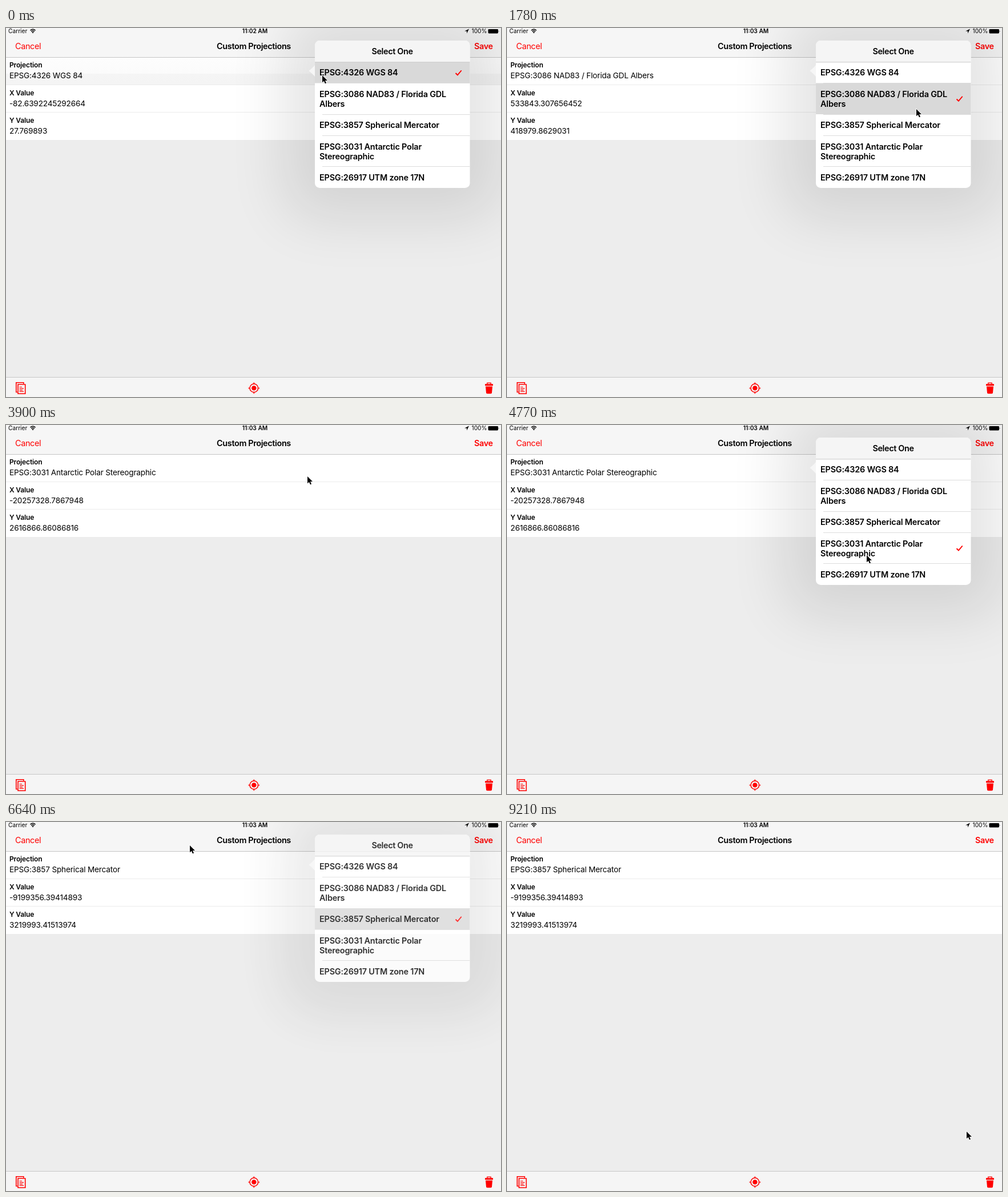
These frames come from a looping animation (867 by 646 pixels, 9310 ms). An HTML page:

```html
<!DOCTYPE html>
<html lang="en">
<head>
<meta charset="utf-8">
<title>Custom Projections</title>
<style>
  html, body { margin: 0; width: 100%; height: 100%; overflow: hidden; background: #ededed; }
  svg { display: block; width: 867px; height: 646px; }
  text { font-family: Inter, "Liberation Sans", sans-serif; white-space: pre; }
  .status { font-size: 10.2px; }
  .bar { font-size: 14.4px; letter-spacing: -.024em; }
  .label { font-size: 12px; font-weight: 600; letter-spacing: -.012em; }
  .value { font-size: 13.6px; letter-spacing: -.012em; }
  .row { font-size: 14.4px; font-weight: 600; letter-spacing: -.012em; }
  .bold { font-weight: 600; }
  .mid { text-anchor: middle; }
  .red { fill: #f00; }
  .line { fill: none; stroke: #f00; }
</style>
</head>
<body>
<svg viewBox="0 0 867 646">
  <defs>
    <filter id="blur" x="-1" y="-1" width="3" height="3"><feGaussianBlur stdDeviation="50"/></filter>
    <clipPath id="card"><rect x="541" y="22" width="271.5" height="258" rx="8.5"/></clipPath>
    <linearGradient id="pressed" x2="0" y2="1">
      <stop offset="0" stop-color="#fdfdfd"/><stop offset=".6" stop-color="#fbfbfb"/>
      <stop offset=".6" stop-color="#f5f5f5"/><stop offset="1" stop-color="#f4f4f4"/>
    </linearGradient>
  </defs>

  <rect width="867" height="646" fill="#ededed"/>
  <rect width="867" height="51" fill="#f6f6f6"/>
  <rect y="51" width="867" height="1" fill="#c6c6c6"/>
  <rect y="52" width="867" height="144" fill="#fff"/>
  <rect id="cell" y="52" width="867" height="47" fill="url(#pressed)"/>
  <path d="M0 99.5H867M0 147.5H867" stroke="#ececec"/>
  <rect y="611" width="867" height="35" fill="#f5f5f5"/>
  <rect y="611" width="867" height="1" fill="#c6c6c6"/>

  <g class="status">
    <text x="4" y="9.2">Carrier</text>
    <text id="clock" class="bold mid" x="436" y="9.2"></text>
    <text x="815.5" y="9.2">100%</text>
  </g>
  <path d="M42.4 4.3Q47 .2 51.6 4.3M44.1 6.3Q47 3.8 49.9 6.3" fill="none" stroke="#000" stroke-width="1.4"/>
  <path d="M45.2 7.4Q47 6 48.8 7.4L47 9.3Z"/>
  <path d="M811 1.5L803.2 5.6H807V9.4Z"/>
  <rect x="844.5" y="2" width="17.5" height="7.4" rx="1.4"/>
  <path d="M862.8 4.2q1.4 1.5 0 3z"/>

  <text class="bar red" x="16" y="37.4">Cancel</text>
  <text class="bar bold mid" x="434" y="37.4">Custom Projections</text>
  <text class="bar bold red" x="820" y="37.4">Save</text>

  <text class="label" x="6" y="69.4">Projection</text>
  <text class="label" x="6" y="117.9">X Value</text>
  <text class="label" x="6" y="166.3">Y Value</text>
  <g id="values">
    <text class="value" x="6" y="88"></text>
    <text class="value" x="6" y="136.5"></text>
    <text class="value" x="6" y="185"></text>
  </g>

  <path class="line" stroke-width="1.6" d="M20 637.5H17.8V620.8H30.8V623M21 624H33.7V640.2H21Z"/>
  <path class="line" stroke-width="1.2" d="M23.5 628.5H28M23.5 631.2H31M23.5 633.8H29M23.5 636.4H31"/>
  <circle class="line" stroke-width="1.5" cx="434.3" cy="630.4" r="7.3"/>
  <circle class="red" cx="434.3" cy="630.4" r="4.2"/>
  <path class="line" stroke-width="1.5" d="M434.3 620.5v3.5M434.3 636.8v3.5M424.4 630.4h3.5M440.7 630.4h3.5"/>
  <path class="red" d="M839 623.2h14v3h-14zM840 627.4h12l-1 11.2q-.2 1.6-1.7 1.6h-6.6q-1.5 0-1.7-1.6z"/>
  <path class="line" stroke-width="1.4" d="M842.8 623.5V621.4H849.2V623.5"/>

  <g id="popover">
    <rect x="486" y="-33" width="382" height="368" rx="50" opacity=".1" filter="url(#blur)"/>
    <path d="M541.5 64Q540 67 530.5 75Q540 83 541.5 86Z" fill="#f6f6f6"/>
    <g clip-path="url(#card)">
      <rect x="541" y="22" width="272" height="258" fill="#fff"/>
      <g id="list"></g>
      <rect x="541" y="22" width="272" height="37.5" fill="#f5f5f5"/>
      <rect x="541" y="59.3" width="272" height="1" fill="#c8c8c8"/>
      <text class="bar bold mid" x="676.5" y="46.2">Select One</text>
    </g>
  </g>

  <path id="cursor" d="M0 0V12.2L2.9 9.7L4.9 14.3L7 13.4L5 8.9H9Z" stroke="#fff" stroke-width="1.4" paint-order="stroke"/>
</svg>
<script>
const LOOP = 9310;
const $ = id => document.getElementById(id);

const rows = [
  { top: 60, end: 96.5, text: ['EPSG:4326 WGS 84'], x: '-82.6392245292664', y: '27.769893' },
  { top: 96.5, end: 151, text: ['EPSG:3086 NAD83 / Florida GDL', 'Albers'], x: '533843.307656452', y: '418979.8629031' },
  { top: 151, end: 188.5, text: ['EPSG:3857 Spherical Mercator'], x: '-9199356.39414893', y: '3219993.41513974' },
  { top: 188.5, end: 242.5, text: ['EPSG:3031 Antarctic Polar', 'Stereographic'], x: '-20257328.7867948', y: '2616866.86086816' },
  { top: 242.5, end: 281, text: ['EPSG:26917 UTM zone 17N'], x: '338473.678057264', y: '3072789.42556255' }
];

$('list').innerHTML = rows.map(({ top, end, text }, i) => `
  <rect class="shade" x="541" y="${top}" width="272" height="${end - top}" fill="#d9d9d9"/>
  ${text.map((s, n) => `<text class="row" x="549" y="${top + 23.8 + n * 17 + (i ? .5 : -.6)}">${s}</text>`).join('')}
  <rect x="554" y="${Math.floor(end)}" width="259" height="1" fill="#dcdcdc"/>
  <path class="check line" stroke-width="1.9" d="M787.5 ${(top + end) / 2 + .8}l3.4 3.2l6.8-8"/>`).join('');
const shades = document.querySelectorAll('.shade');
const checks = document.querySelectorAll('.check');
const values = $('values').children;

// bursts of screen updates: start, end, count
const bursts = [[0, 0, 1], [120, 840, 5], [1130, 1250, 2], [1630, 2260, 5], [2370, 2670, 3],
  [2810, 3760, 8], [3900, 4050, 2], [4380, 5390, 7], [5540, 5690, 2], [5850, 6160, 3],
  [6520, 6640, 2], [6790, 7080, 3], [8010, 8480, 4], [9210, 9210, 1]];

// pointer path: time, x, y
const path = [[0, 554, 83], [120, 554, 83], [300, 545, 86], [480, 545, 86], [840, 746, 187],
  [1130, 740, 178], [1250, 717, 142], [1630, 717, 142], [1945, 530, 88], [2102, 550, 96],
  [2260, 795, 237], [2670, 720, 222], [3489, 690, 214], [3624, 650, 180], [3900, 528, 90],
  [4050, 530, 92], [4885, 655, 262], [5222, 650, 260], [5540, 524, 77], [5690, 528, 82],
  [6160, 690, 170], [6520, 690, 170], [6640, 322, 41], [7080, 304, 78], [7990, 304, 78],
  [8167, 620, 420], [8324, 816, 622], [8480, 804, 542], [9200, 804, 542], [9210, 805, 542]];

// step tracks: time, value
const opacity = [[0, 1], [120, .85], [300, 0], [480, 1], [1780, .8], [1940, 0], [2100, 1],
  [3700, .8], [3900, 0], [4050, 1], [5380, .8], [5540, 0], [5690, 1], [6640, .8], [6790, 0]];
const choice = [[0, 0], [1630, 1], [3480, 3], [5200, 4], [6520, 2]];
const tapped = [[0, 1], [300, 0], [1630, 1], [1940, 0], [3480, 1], [3900, 0], [5200, 1], [5540, 0], [6520, 1]];

const last = (track, t) => track.filter(k => k[0] <= t).pop();

function hold(t) {
  const [from, to, count] = last(bursts, t);
  if (count < 2) return from;
  const step = (to - from) / (count - 1);
  return Math.min(to, from + Math.floor((t - from) / step + 1e-6) * step);
}

function pointer(t) {
  const a = last(path, t), b = path[path.indexOf(a) + 1] || a;
  const k = a === b ? 0 : (t - a[0]) / (b[0] - a[0]);
  return [1, 2].map(i => Math.round(a[i] + (b[i] - a[i]) * k));
}

function draw(now) {
  const t = hold(now % LOOP);
  const pick = last(choice, t)[1], row = rows[pick], tap = last(tapped, t)[1];
  $('clock').textContent = t < 1630 ? '11:02 AM' : '11:03 AM';
  $('cell').style.opacity = t < 1630 ? 1 : 0;
  [row.text.join(' '), row.x, row.y].forEach((s, i) => values[i].textContent = s);
  rows.forEach((_, i) => {
    shades[i].style.opacity = i === pick ? tap : 0;
    checks[i].style.opacity = i === pick ? 1 : 0;
  });
  $('list').setAttribute('transform', `translate(0 ${t > 2000 && t < 3900 ? 1 : 0})`);
  $('popover').style.opacity = last(opacity, t)[1];
  $('cursor').setAttribute('transform', `translate(${pointer(t)})`);
}

let start;
function frame(now) {
  start ??= now;
  draw(Math.max(0, now - start));
  requestAnimationFrame(frame);
}
draw(0);
requestAnimationFrame(frame);
</script>
</body>
</html>
```
